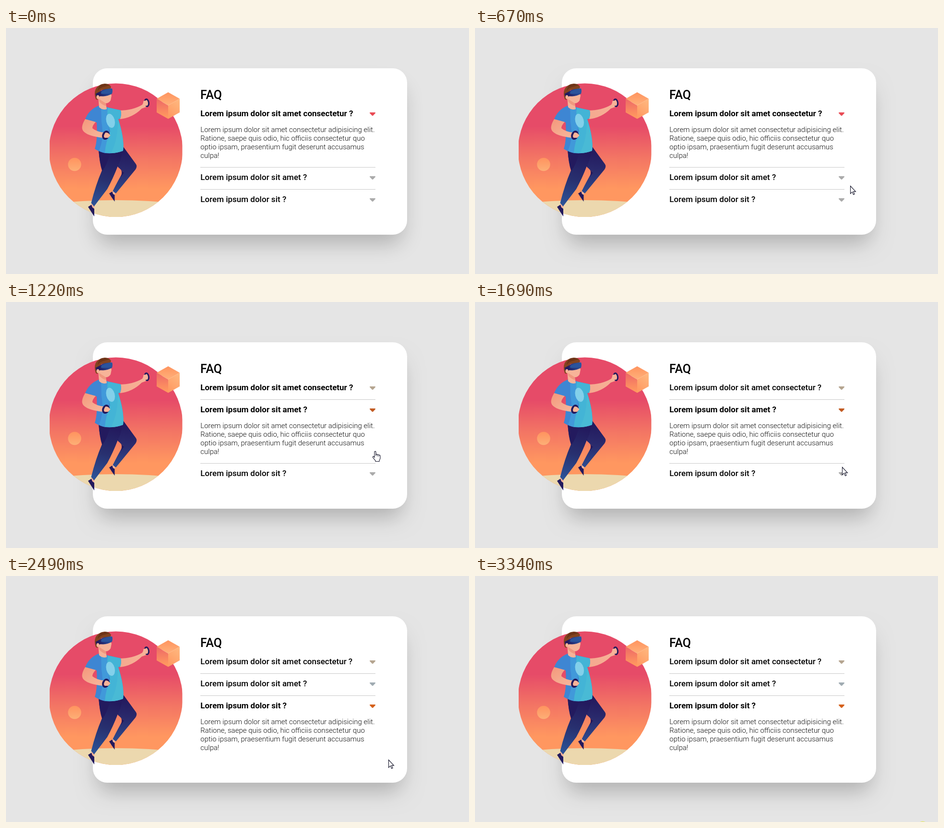
Animation of 965 by 513 pixels, one loop 3.42 s. Source, as an HTML page with a canvas:

```html
<!DOCTYPE html>
<html lang="en">
<head>
<meta charset="utf-8">
<title>FAQ accordion</title>
<style>
  html, body { margin: 0; width: 100%; height: 100%; overflow: hidden; background: #e5e5e5; }
  canvas { display: block; }
</style>
</head>
<body>
<canvas id="stage" width="965" height="513"></canvas>
<script>
const ctx = document.getElementById('stage').getContext('2d');
const LOOP = 3420;
const NAVY = '#231a5e', SKIN = '#f7b398', GREY = '#ababab';

const titles = [
  'Lorem ipsum dolor sit amet consectetur ?',
  'Lorem ipsum dolor sit amet ?',
  'Lorem ipsum dolor sit ?'
];
const answer = [
  'Lorem ipsum dolor sit amet consectetur adipisicing elit.',
  'Ratione, saepe quis odio, hic officiis consectetur quo',
  'optio ipsam, praesentium fugit deserunt accusamus',
  'culpa!'
];

// When each title is bold; the weight lags behind the opening.
const boldSpans = [[0, 1440], [1220, 2370], [2170, LOOP]];
const openTimes = [0, 1170, 2080];
const openColors = ['#e94b55', '#c25b22', '#d5611c'];
const closedColors = ['#b5a590', '#a0abb2', GREY];

const ARROW = new Path2D('M.5 .5V16.4L4.2 12.9 6.7 18.5 9 17.5 6.6 12.1H11.4Z');
const HAND = new Path2D('M-1 1.5Q.5-.8 2 1.5V7Q4 5.5 5 7.5Q7.3 6.2 8 8.3' +
  'Q10.5 7.5 11 10V15L9 20V21.5H1V20L-4.5 13Q-4.5 10.5-2.5 11L-1 13Z');

function fill(shape, color) {
  ctx.fillStyle = color;
  ctx.fill(typeof shape === 'string' ? new Path2D(shape) : shape);
}

function oval(x, y, rx, ry = rx, turn = 0) {
  const p = new Path2D();
  p.ellipse(x, y, rx, ry, turn, 0, Math.PI * 2);
  return p;
}

function ramp(x0, y0, x1, y1, ...colors) {
  const g = ctx.createLinearGradient(x0, y0, x1, y1);
  colors.forEach((c, i) => g.addColorStop(i / (colors.length - 1), c));
  return g;
}

function text(str, x, y, weight, size, color) {
  ctx.font = `${weight} ${size}px Roboto, sans-serif`;
  ctx.fillStyle = color;
  ctx.fillText(str, x, y);
}

function drawCard() {
  ctx.fillStyle = '#e5e5e5';
  ctx.fillRect(0, 0, 965, 513);
  ctx.save();
  ctx.shadowColor = 'rgba(0,0,0,.23)';
  ctx.shadowBlur = 44;
  ctx.shadowOffsetY = 28;
  const base = new Path2D();
  base.roundRect(191, 94, 635, 327, 24);
  fill(base, '#000');
  ctx.restore();
  const card = new Path2D();
  card.roundRect(181, 84, 655, 347, 30);
  fill(card, '#fff');
}

function drawScene() {
  ctx.save();
  ctx.beginPath();
  ctx.rect(91, 110, 276.5, 290);
  ctx.clip();
  const disc = oval(229, 254.8, 139.3);
  fill(disc, ramp(0, 205, 0, 335, '#e64b68', '#f37564', '#ff9760'));
  ctx.clip(disc);
  fill('M91 367Q228 351 368 367V400H91Z', '#ecd8ae');
  ctx.restore();
  fill(oval(143, 284.5, 13.7), ramp(0, 271, 0, 298, '#ff935f', '#fdaf76'));

  fill('M338 134L362 147.5 338 161.5 314 147.5Z', ramp(0, 134, 0, 161, '#ff945f', '#ffb079'));
  fill('M314 147.5L338 161.5V189.5L314 176Z', ramp(0, 148, 0, 185, '#ee6866', '#ff985f'));
  fill('M362 147.5L338 161.5V189.5L362 176Z', ramp(338, 180, 362, 150, '#ff9c64', '#ffb980'));
}

function drawLegs() {
  fill('M179 364L186 368 183 377 177 372Z', SKIN);
  fill('M223 338L229 342 226 349 220 345Z', SKIN);
  fill('M171 373L178 368.5 180 374 184 377V393Q178 384 171 373Z', NAVY);
  fill('M215 345L221.5 341 223 346 226.5 348V362Q221 355 215 345Z', NAVY);
  fill('M206 256L244 247Q255 262 271 284Q274 289 270 295L229 345 222.5 340Q234 317 244 300L229 285Z',
    ramp(240, 255, 235, 345, NAVY, '#2b2c6e', '#2d4c90'));
  fill('M234 256L233 289 246 302 239 311Q245 296 234 291Z', NAVY);
  fill('M193 253Q214 264 242 254Q241 274 233 288Q223 314 211 336L183.5 372 177.5 365Q187 327 200 297Q195 282 193 253Z',
    ramp(215, 260, 185, 370, NAVY, '#28306f', '#2d5498'));
  fill('M193 253L216 262Q211 284 201 298Q195 281 193 253Z', NAVY);
}

function drawBody() {
  // Far arm
  fill('M236 172Q264 172 284 160L288 152Q294 148 298 153Q300 160 294 164L283 168Q264 187 238 190Z',
    ramp(238, 180, 298, 155, '#f5a98f', SKIN));
  ctx.strokeStyle = NAVY;
  ctx.lineWidth = 3;
  ctx.stroke(oval(293.3, 156, 4.2, 7.5, -0.15));
  fill('M286 153Q291 149 293 154L293 162 287 164Z', SKIN);

  // Shirt
  fill('M193 162L209 165 239 171.5Q241 181 238 189L234 190Q247 230 244 256Q225 263 208 261Q195 259 185 252Q191 235 189 197L165 190Q173 170 193 162Z',
    '#3e86d3');
  fill('M198 162L214 166 226 169Q213 199 214 219Q209 238 208 261Q197 259 194 255Q205 230 199 196Z', '#4199da');
  fill('M212 166L239 171.5Q241 181 238 189L234 190Q247 230 244 256Q225 263 206 260Q208 238 217 215Q209 190 212 166Z', '#43b4d6');
  fill('M233 190Q247 230 244 256Q232 261 219 261Q234 230 233 190Z', '#49bad5');
  fill(oval(217.8, 193.5, 8.8, 15, -0.25), '#83d0ea');

  // Near arm
  fill('M165 190L187 196Q180 203 180 209Q188 216 204 218L211 216 217 223 212 230 203 229Q172 226 162 216Q154 208 165 190Z',
    ramp(165, 190, 190, 228, '#f49a7d', SKIN));
  ctx.lineWidth = 4;
  ctx.stroke(oval(208, 223.5, 5.5, 7.8, 0.4));
  fill('M207 218L213 219 217.5 224 213 229 206 229Z', SKIN);
}

function drawHead() {
  fill('M192 140L217 133 220 141 218 151Q214 157 208 157L210 169Q201 172 194 165Z', SKIN);
  fill('M194 148L208 157 209 163Q199 160 194 153Z', '#f0987f');
  fill('M187 148Q183 136 187 127Q193 117 206 116Q216 116 219 123L217 128 199 129Q194 135 195 143L190 150Z', '#83431f');
  fill('M198 118Q209 115 216 119L207 122Q197 123 191 131Q192 122 198 118Z', '#6d3418');
  fill('M187 137L197 132 200 142 188 143Z', NAVY);
  fill('M195 134Q199 127 221 126Q223 130 221 137Q210 144 196 142Z',
    ramp(196, 143, 221, 127, NAVY, '#25418b', '#2c5da6'));
  fill('M199 132Q207 128 221 127L221 134Q210 139 198 137Z', '#2b539b');
  fill(oval(191.5, 144, 2.8, 4), SKIN);
}

function caret(y, color) {
  ctx.fillStyle = ctx.strokeStyle = color;
  ctx.lineWidth = 2;
  ctx.lineJoin = 'round';
  const p = new Path2D(`M759 ${y - 1}H769L765 ${y + 3.4}Q764 ${y + 4.3} 763 ${y + 3.4}Z`);
  ctx.fill(p);
  ctx.stroke(p);
}

function drawFaq(t) {
  const open = openTimes.filter(s => t >= s).length - 1;
  text('FAQ', 405, 148, 500, 25, '#000');
  let y = 178;
  titles.forEach((title, i) => {
    const [from, to] = boldSpans[i];
    text(title, 405.3, y + 6, t >= from && t < to ? 700 : 500, 17, '#000');
    caret(y, i === open ? openColors[i] : i < open ? closedColors[i] : GREY);
    if (i === open) {
      answer.forEach((line, n) => text(line, 405.3, y + 39 + n * 18, 300, 15, '#111'));
      y += 87;
    }
    y += 46;
    if (i < 2) {
      ctx.fillStyle = '#c9c9c9';
      ctx.fillRect(405, y - 21, 365, 1);
    }
  });
}

const linear = p => p;
const easeOut = p => 1 - (1 - p) ** 1.5;
const smooth = p => p * p * (3 - 2 * p);

// start, end, steps, from, to, easing
const moves = [
  [150, 670, 9, [868, 499], [782, 329], linear],
  [740, 1020, 5, [782, 329], [769, 311], easeOut],
  [1440, 1890, 8, [769, 311], [763.5, 354], easeOut],
  [2370, 2880, 9, [763.5, 354], [892, 465], smooth],
  [2950, 3160, 4, [892, 465], [941, 519], linear]
];

function pointerAt(t) {
  const move = moves.filter(m => t >= m[0]).pop();
  if (!move) return null;
  const [start, end, steps, a, b, ease] = move;
  const step = Math.floor((t - start) / (end - start) * (steps - 1) + 0.15) + 1;
  const p = ease(Math.min(1, step / steps));
  return a.map((v, i) => Math.round(v + (b[i] - v) * p));
}

function drawPointer(t) {
  const pos = pointerAt(t);
  if (!pos) return;
  const [x, y] = pos;
  const hand = (t < 1440 && x < 771) || (t >= 1440 && t < 2370 && y > 346);
  const shape = hand ? HAND : ARROW;
  ctx.save();
  ctx.translate(x, y);
  fill(shape, '#fff');
  ctx.strokeStyle = '#15152a';
  ctx.lineWidth = 1.1;
  ctx.lineJoin = 'miter';
  ctx.stroke(shape);
  if (hand) {
    ctx.lineWidth = 0.9;
    ctx.stroke(new Path2D('M2 7V10M5 8V11M8 9V11.5'));
  }
  ctx.restore();
}

const clicks = [[1170, 1220, 768.5, 311], [2020, 2170, 763, 354], [3340, LOOP, 933, 523.5]];

function drawClick(t) {
  const hit = clicks.find(c => t >= c[0] && t < c[1]);
  if (!hit) return;
  ctx.save();
  ctx.globalCompositeOperation = 'multiply';
  fill(oval(hit[2], hit[3], 12), '#ffff78');
  ctx.restore();
}

function frame(now) {
  const t = now % LOOP;
  drawCard();
  drawScene();
  drawLegs();
  drawBody();
  drawHead();
  drawFaq(t);
  drawPointer(t);
  drawClick(t);
  requestAnimationFrame(frame);
}
requestAnimationFrame(frame);
</script>
</body>
</html>
```
